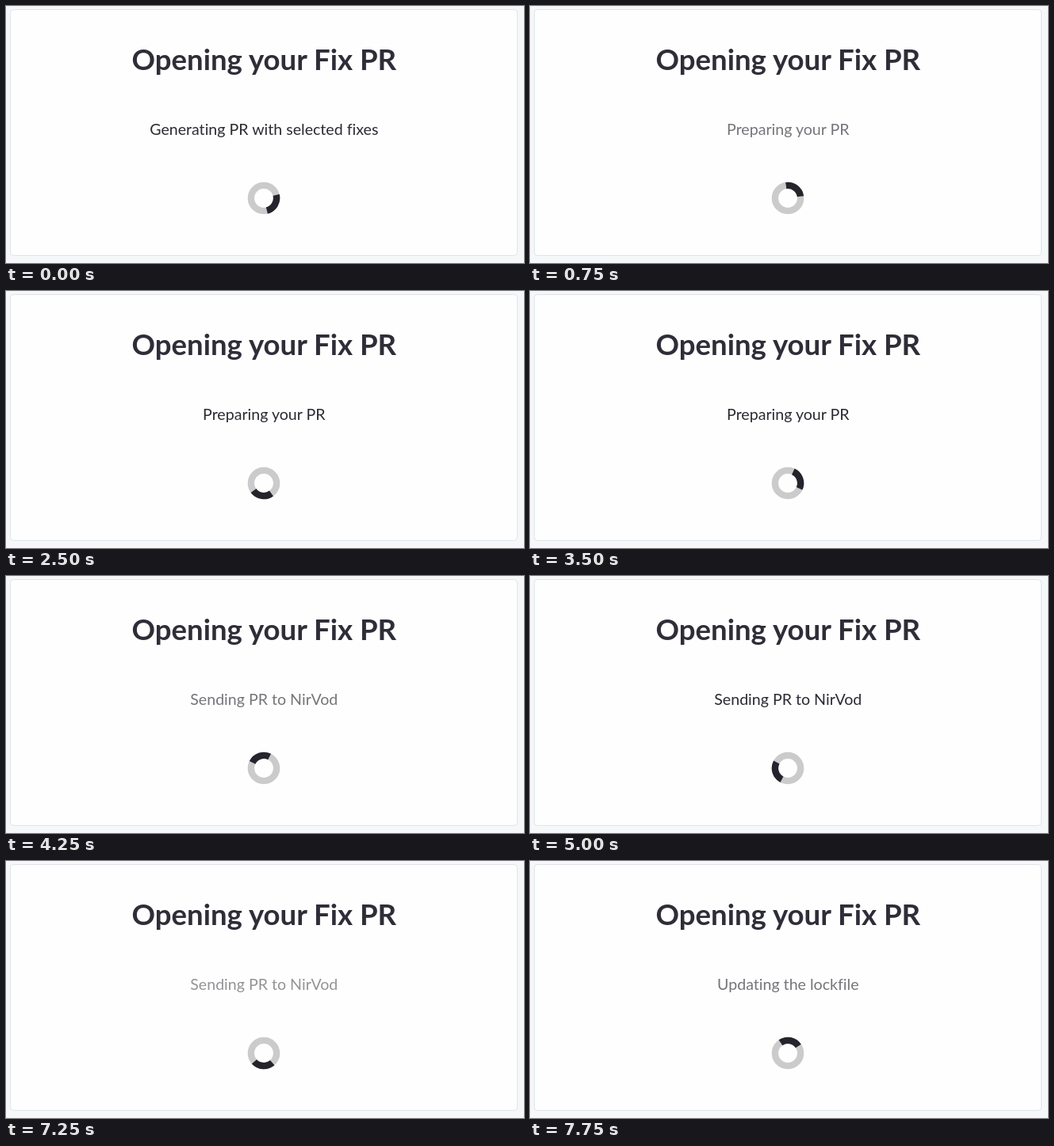
Animation of 653 by 325 pixels, one loop 8000 ms. Source, as an HTML page:

```html
<!DOCTYPE html>
<html lang="en">
<head>
<meta charset="utf-8">
<title>Opening your Fix PR</title>
<style>
  html, body { margin: 0; width: 100%; height: 100%; overflow: hidden; background: #f5f7f9; }
  svg { display: block; width: 653px; height: 325px; }
  text {
    font-family: Lato, "Open Sans", sans-serif;
    font-variant-ligatures: none;
    text-anchor: middle;
    fill: #2e2d38;
  }
  .title { font-size: 36.6px; font-weight: 700; }
  .status { font-size: 19.6px; fill: #2c2b33; }
  .ring { fill: none; stroke-width: 8.4; }
</style>
</head>
<body>
<svg viewBox="0 0 653 325">
  <rect x="5.5" y="4.5" width="639" height="311" rx="4" fill="#fefefe" stroke="#dfe4e9"/>
  <text class="title" x="325.3" y="81">Opening your Fix PR</text>
  <text class="status" id="status" x="325.3" y="163"></text>
  <g transform="translate(325 243)">
    <circle class="ring" r="16.1" stroke="#cbcbcb"/>
    <path class="ring" id="arc" d="M-11.38-11.38A16.1 16.1 0 0 1 11.38-11.38" stroke="#25242d"/>
  </g>
</svg>
<script>
  const LOOP = 8000, STEP = 250, CYCLE = 3500, FADE = 500;
  const messages = [
    "Generating PR with selected fixes",
    "Preparing your PR",
    "Sending PR to NirVod",
    "Updating the lockfile"
  ];
  // [time in ms, total rotation in degrees]
  const spin = [
    [0, 121], [750, 397], [1750, 728], [3500, 1150],
    [5000, 1693], [6250, 2077], [7500, 2410], [7750, 2531], [8000, 2613]
  ];
  const label = document.getElementById("status");
  const arc = document.getElementById("arc");

  function angleAt(t) {
    const i = spin.findIndex(key => key[0] > t);
    const [t0, a0] = spin[i - 1], [t1, a1] = spin[i];
    return a0 + (a1 - a0) * (t - t0) / (t1 - t0);
  }

  function opacityAt(phase) {
    if (phase < FADE) return 1 - Math.pow(1 - phase / FADE, 1.5);
    return Math.min(1, (CYCLE - phase) / FADE);
  }

  function render(t) {
    const shifted = t + CYCLE - FADE;
    label.textContent = messages[Math.floor(shifted / CYCLE)];
    label.setAttribute("opacity", opacityAt(shifted % CYCLE));
    arc.setAttribute("transform", `rotate(${angleAt(t) % 360})`);
  }

  const start = performance.now();
  function tick() {
    const t = Math.max(0, performance.now() - start) % LOOP;
    render(Math.floor(t / STEP) * STEP);
    requestAnimationFrame(tick);
  }
  render(0);
  requestAnimationFrame(tick);
</script>
</body>
</html>
```
